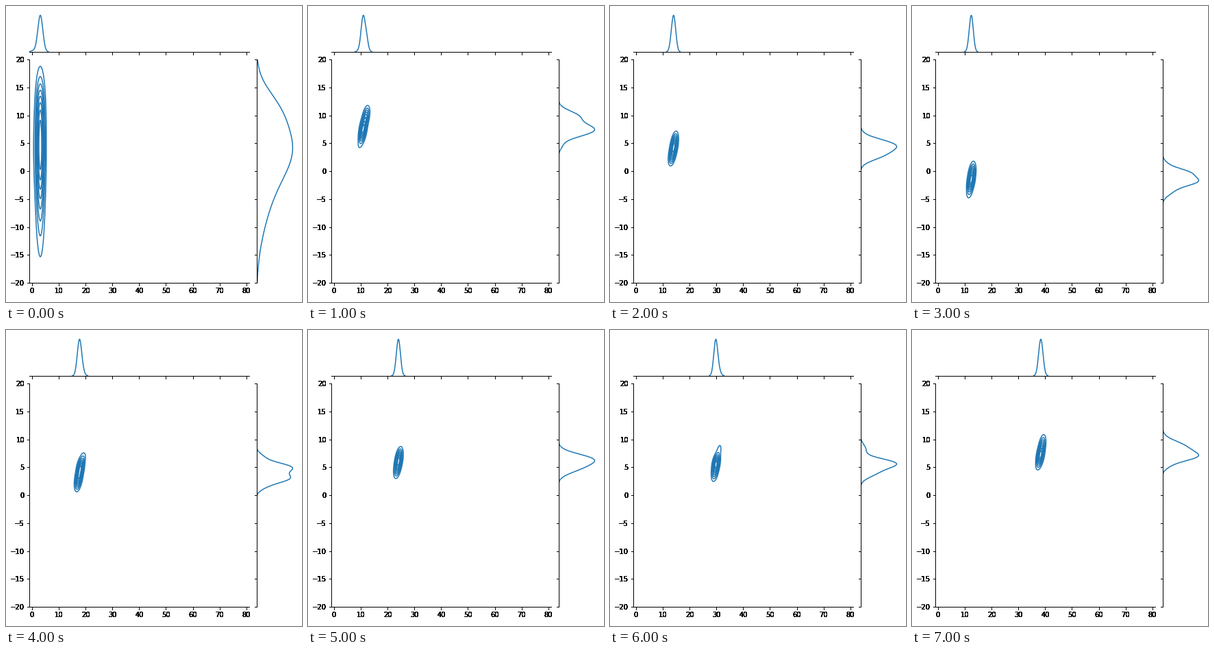
A matplotlib script that plays this animation: 432x432 px, repeating every 8 s.

```python
import numpy as np
import matplotlib.pyplot as plt
from matplotlib.animation import FuncAnimation

SIZE = 432
BLUE = "#1f77b4"
LEFT, RIGHT, TOP, BOTTOM = 34.04, 421.0, 10.8, 404.1
WIDEN = 1.15  # the joint estimate is smoother than the marginals
LAYERS = 10   # repeated panels give the labels their heavy edges

plt.rcParams["font.family"] = "DejaVu Sans"
fig = plt.figure(figsize=(6, 6), dpi=72, facecolor="white")

# Joint plot grid: six cells each way with gaps of a fifth of a cell
cell_w = (RIGHT - LEFT) / 7
cell_h = (BOTTOM - TOP) / 7
joint_right = LEFT + 5.8 * cell_w
joint_top = BOTTOM - 5.8 * cell_h


def panel(x0, y0, x1, y1, spines):
    ax = fig.add_axes([x0 / SIZE, 1 - y1 / SIZE, (x1 - x0) / SIZE, (y1 - y0) / SIZE])
    ax.patch.set_visible(False)
    for name, spine in ax.spines.items():
        spine.set_visible(name in spines)
    ax.set(xlim=(0, 1.05), ylim=(0, 1.05), xticks=[], yticks=[])
    return ax


def make_panels():
    joint = panel(LEFT, joint_top, joint_right, BOTTOM, ("left", "bottom"))
    top = panel(LEFT, TOP, joint_right, TOP + cell_h, ("bottom",))
    side = panel(RIGHT - cell_w, joint_top, RIGHT, BOTTOM, ("left",))
    for ax in (joint, top):
        ax.set(xlim=(-1, 81), xticks=range(0, 81, 10))
    for ax in (joint, side):
        ax.set(ylim=(-20, 20), yticks=range(-20, 21, 5))
    top.tick_params(labelbottom=False)
    side.tick_params(labelleft=False)
    return joint, top, side


def bell(d, s):
    return np.exp(-(d / s) ** 2 / 2)


def marginal(d):
    d = d / d.max()
    return np.where(d > 0.004, d, np.nan)


def cloud(blobs, sx=0.65, lean=0.3):
    """Draw one density; a blob is (height, x, y, sy), leaning by x per y."""
    x = np.arange(-1, 81.05, 0.1)
    y = np.arange(-22, 22.05, 0.1)
    gx, gy = np.meshgrid(x, y)
    z = sum(h * bell(gy - my, sy * WIDEN)
            * bell(gx - mx - lean * (gy - my), sx * WIDEN)
            for h, mx, my, sy in blobs)
    across = 0
    for h, mx, my, sy in blobs:
        wide = np.hypot(sx, lean * sy)
        across = across + h * sy / wide * bell(x - mx, wide)
    along = sum(h * bell(y - my, sy) for h, mx, my, sy in blobs)

    levels = np.linspace(0, z.max(), 10)[1:-1]
    return (
        joint.contour(x, y, z, levels, colors=BLUE, linewidths=1.5),
        top.plot(x, marginal(across), color=BLUE, lw=1.5)[0],
        side.plot(marginal(along), y, color=BLUE, lw=1.5)[0],
    )


joint, top, side = make_panels()
for _ in range(LAYERS - 1):
    make_panels()

clouds = [
    cloud([(.85, 3.1, 4.7, 5.5), (.25, 3.1, 11.8, 3.2), (.3, 3.1, -4.8, 6.4),
           (.05, .6, 4, 5)], sx=.93, lean=0),
    cloud([(1, 10.8, 7.4, 1.15), (.5, 12, 9.9, .95), (.07, 9.4, 4.5, .7)]),
    cloud([(1, 14.2, 4.6, 1.1), (.45, 13.4, 2.7, .9)]),
    cloud([(.85, 12.3, -1.85, .8), (.67, 12.7, -.25, .8), (.25, 11.8, -3.55, .85),
           (.08, 13, 1.35, .65)]),
    cloud([(.95, 18.1, 5, .86), (.88, 17.4, 3, .86), (.15, 19.2, 6.9, .65),
           (.13, 16.9, 1.4, .65)]),
    cloud([(1, 24.2, 6.4, 1), (.45, 23.6, 4.7, .9)]),
    cloud([(1, 29.9, 5.7, .85), (.4, 29.4, 4, .85), (.15, 31.1, 8.25, .85)]),
    cloud([(.85, 38.1, 6.9, .88), (.6, 38.8, 8.7, 1.05), (.1, 37.3, 5.15, .6)]),
]


def update(i):
    for k, artists in enumerate(clouds):
        for artist in artists:
            artist.set_visible(k == i)
    return clouds[i]


anim = FuncAnimation(fig, update, frames=len(clouds), interval=1000,
                     repeat=True, repeat_delay=0, blit=False)
plt.show()
```
